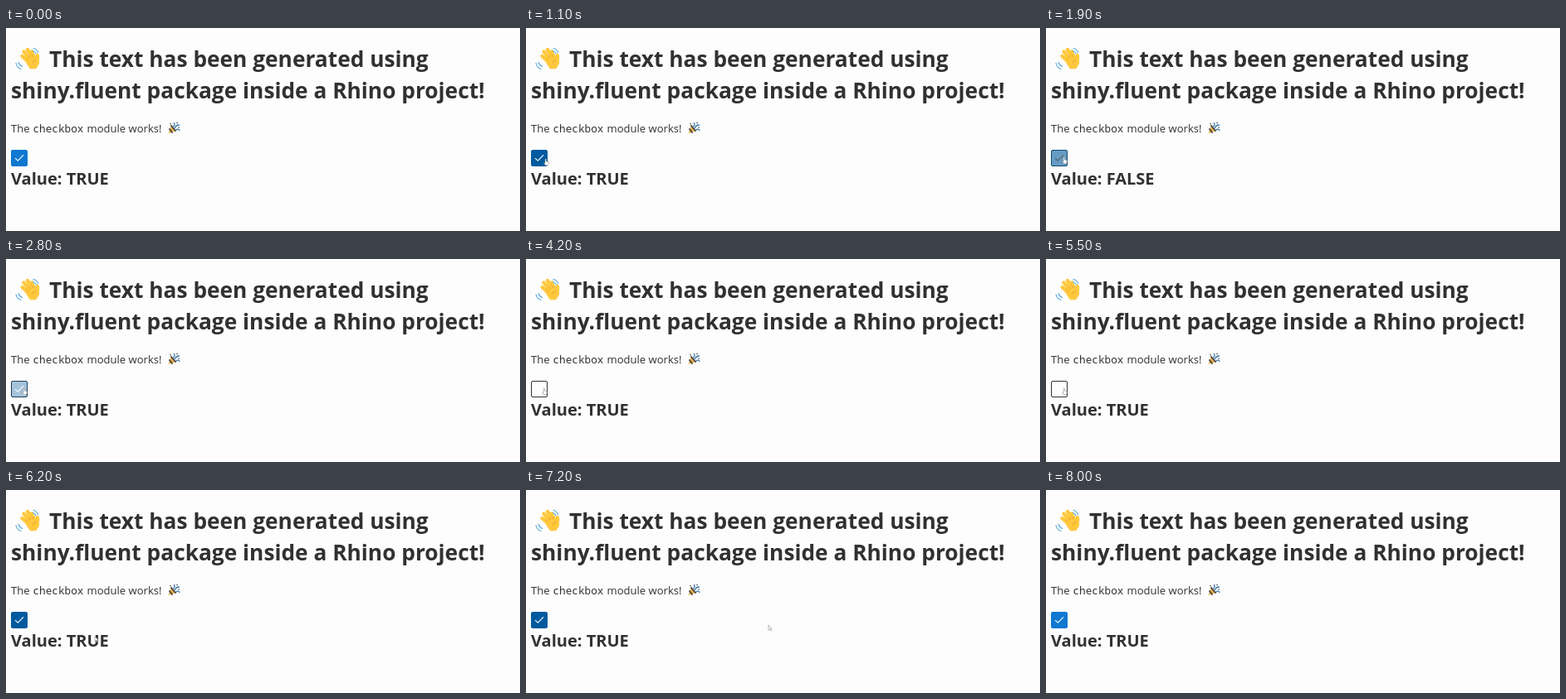
An HTML page that plays this animation: 619x245 px, repeating every 8.4 s.

```html
<!DOCTYPE html>
<html lang="en">
<head>
<meta charset="utf-8">
<title>Checkbox demo</title>
<style>
  html, body { margin: 0; width: 100%; height: 100%; overflow: hidden; background: #fdfdfd; }
  svg { display: block; width: 619px; height: 245px; }
  text { font-family: "Open Sans", "Noto Sans", sans-serif; fill: #323130; white-space: pre; }
  .title { font-size: 26.3px; font-weight: 700; }
  .body { font-size: 13.05px; }
  .code { font-family: "Noto Sans Mono", "DejaVu Sans Mono", monospace; font-size: 12.7px; }
  .value { font-size: 20px; font-weight: 700; }
  .line { fill: none; stroke-linecap: round; stroke-linejoin: round; }
</style>
</head>
<body>
<svg viewBox="0 0 619 245">
  <!-- waving hand -->
  <g class="line" stroke="#ffc83d" stroke-width="4.4">
    <path d="M26 40L19.5 34M28 37L21.5 28.5M31 35L26 26M34 36L31 28.5M36 43Q39 38 37.8 33"/>
    <path d="M25 39L34 35L38 42L35 47L30 47Z" fill="#ffc83d"/>
  </g>
  <path class="line" d="M24.5 36L27 38.5M27.5 33.5L29.5 36M31 32L32.5 34.5M32 42Q33 39 36 39" stroke="#e39d27" stroke-width=".9"/>
  <path class="line" d="M33 24.5Q37 25 38.5 29.5M32.5 27.5Q35 28 36 31M12 42.5Q13 48 18 49.5M15 41.5Q16 45 19.5 46.5" stroke="#5eaee0" stroke-width="1.2"/>

  <text class="title" x="52" y="47">This text has been generated using</text>
  <text class="title" x="6" y="84.5">shiny.fluent package inside a Rhino project!</text>

  <text class="body" x="6" y="125.5">The</text>
  <text class="code" x="32.5" y="125.5">checkbox</text>
  <text class="body" x="97.5" y="125.5">module works!</text>

  <!-- party popper -->
  <path d="M195.5 127L199 117.5L205 124Z" fill="#e8b44c"/>
  <path class="line" d="M197 122L200 126M199 118L204 124" stroke="#493f3c" stroke-width="1.8"/>
  <path class="line" d="M201 119Q204 118 202.5 114.5M203 121Q205 117 208.5 117M205 123Q207 121 209 123.5" stroke="#3b77a5" stroke-width="1.3"/>
  <path class="line" d="M198 115.5h.1M206 114.5h.1M208 120h.1" stroke="#555b64" stroke-width="1.7"/>

  <rect id="box" x="6.5" y="147.5" width="19" height="19" rx="1.5"/>
  <path id="tick" class="line" d="M11.3 157.3L14.3 160.2L20.7 153.6" stroke-width="1.1"/>
  <text id="value" class="value" x="6" y="189"></text>

  <g id="cursor" fill="#fff" stroke="#8a8a8a" stroke-width=".6" stroke-linejoin="round">
    <path id="arrow" d="M0 0V6.2L1.5 4.9L2.5 7L3.4 6.6L2.5 4.6H4.2Z"/>
    <path id="pointer" d="M0 .5Q.7 -.5 1.4 .5V3L4.2 3.6V6L3.4 7.8H.4L-1.4 5L0 5.2Z"/>
  </g>
</svg>
<script>
const LOOP = 8400, STEP = 100, FADE = 250;
const [box, tick, value, cursor, arrow, pointer] =
  ["box", "tick", "value", "cursor", "arrow", "pointer"].map(id => document.getElementById(id));

const WHITE = [253, 253, 253], INK = [50, 49, 48], BLUE = [15, 120, 208], DARK_BLUE = [0, 90, 158];

// time, new state, how far the fade has come on its first step
const clicks = [
  [-FADE, true, 0], [1900, false, .4], [2800, true, .35], [3500, false, .4],
  [4200, true, 0], [4900, false, .4], [5500, true, 0]
];
// time, x, y
const path = [
  [700, 96, 224], [900, 52, 187], [1100, 23, 158], [1300, 21, 156],
  [6000, 21, 156], [6300, 150, 187], [6600, 290, 165], [7100, 290, 165],
  [7200, 292, 163], [7300, 292, 163], [7600, 300, 188], [7700, 300, 188], [8000, 316, 244]
];

const clamp = v => Math.max(0, Math.min(1, v));
const lerp = (a, b, k) => a + (b - a) * k;
const mix = (a, b, k) => a.map((v, i) => lerp(v, b[i], k));
const rgb = c => `rgb(${c.map(Math.round)})`;

function cursorAt(t) {
  const i = path.findIndex(p => p[0] > t);
  if (i < 1) return null;
  const [a, b] = [path[i - 1], path[i]];
  const k = (t - a[0]) / (b[0] - a[0]);
  return [lerp(a[1], b[1], k), lerp(a[2], b[2], k)];
}

function draw(t) {
  const [start, checked, first] = clicks.findLast(c => c[0] <= t);
  const fade = clamp(first + (t - start) / FADE);
  const level = checked ? fade : 1 - fade;
  const hover = clamp((t - 900) / 200) * clamp((7600 - t) / 250);
  const blue = mix(BLUE, DARK_BLUE, hover);

  box.setAttribute("fill", rgb(mix(WHITE, blue, level)));
  box.setAttribute("stroke", rgb(mix(INK, blue, level)));
  tick.setAttribute("stroke", checked ? "#fff" : "#605e5c");
  value.textContent = "Value: " + (checked ? "TRUE" : "FALSE");

  const spot = cursorAt(t);
  cursor.style.display = spot ? "" : "none";
  if (spot) {
    const overBox = spot[0] < 27 && spot[1] < 167;
    cursor.setAttribute("transform", `translate(${spot})`);
    arrow.style.display = overBox ? "none" : "";
    pointer.style.display = overBox ? "" : "none";
  }
}

function tickFrame() {
  draw(Math.floor(performance.now() % LOOP / STEP) * STEP);
  requestAnimationFrame(tickFrame);
}
tickFrame();
</script>
</body>
</html>
```
